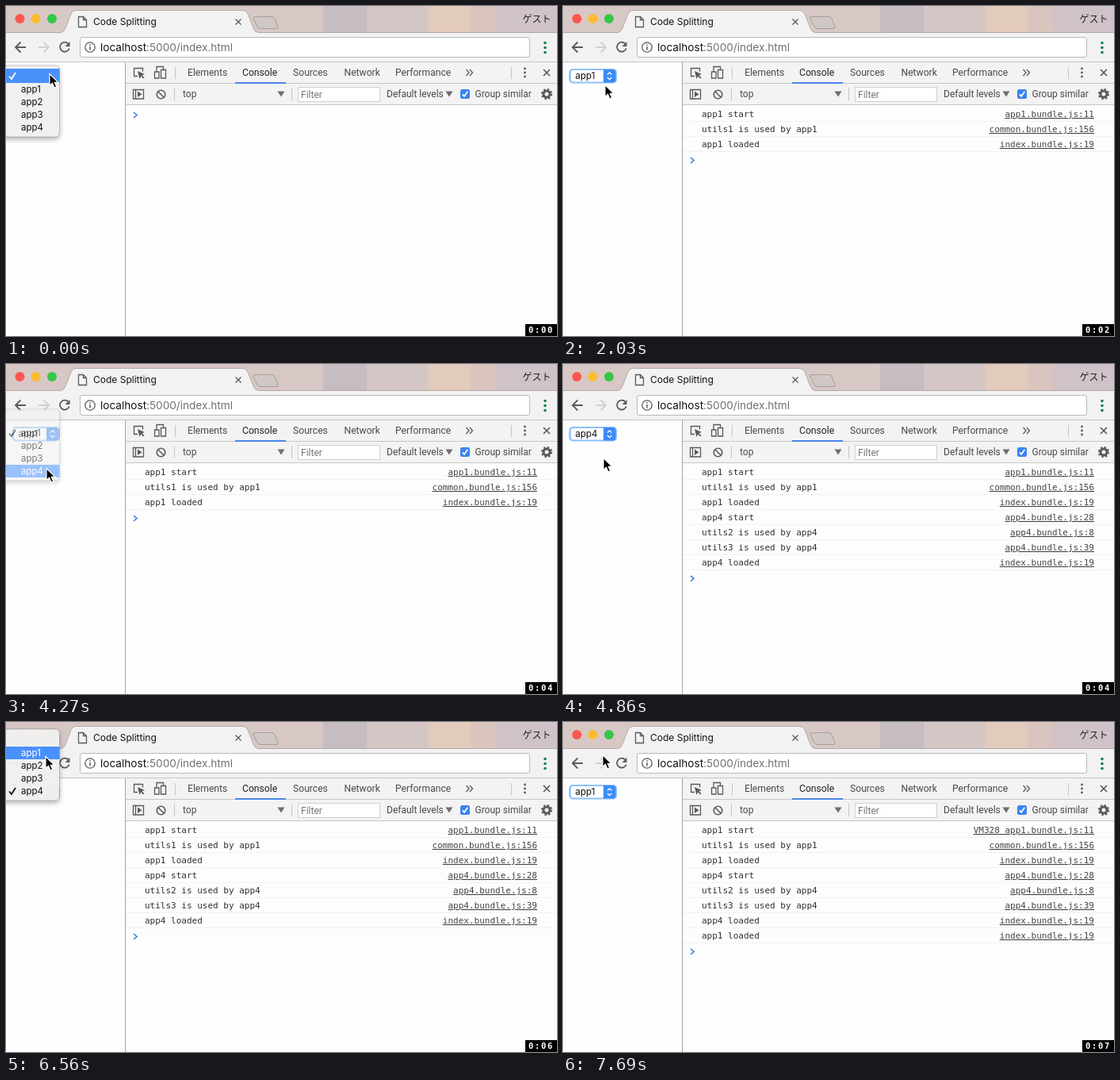
These frames come from a looping animation (695 by 416 pixels, 8 s). An HTML page:

```html
<!DOCTYPE html>
<html lang="en">
<head>
<meta charset="utf-8">
<title>Code Splitting</title>
<style>
  html, body { margin: 0; width: 100%; height: 100%; overflow: hidden; background: #fefefe; }
  svg { display: block; width: 695px; height: 416px; }
  text { white-space: pre; }
  .sys { font-family: Inter, sans-serif; fill: #111; }
  .ui { font: 12px Roboto, sans-serif; fill: #4a4a4a; }
  .mono { font: 11px "DejaVu Sans Mono", monospace; fill: #303030; }
  .link { text-anchor: end; text-decoration: underline; fill: #444; }
  .line { fill: none; stroke: #5a5a5a; stroke-width: 1.3; }
  .sep { fill: none; stroke: #c6c6c6; }
  .item { font-size: 11.5px; }
</style>
</head>
<body>
<svg viewBox="0 0 695 416">
  <defs>
    <filter id="shadow" x="-30%" y="-30%" width="160%" height="160%">
      <feDropShadow dx="0" dy="3" stdDeviation="3" flood-opacity=".3"/>
    </filter>
  </defs>

  <!-- tab strip -->
  <path fill="#d8c8c5" d="M0 0H695V34H0z"/>
  <path fill="#c5bdc2" d="M400 0h55v34h-55z"/>
  <path fill="#d5c6c6" d="M455 0h78v34h-78z"/>
  <path fill="#e2cabc" d="M533 0h53v34h-53z"/>
  <path fill="#dac5be" d="M586 0h32v34h-32z"/>
  <path fill="#cfc3c9" d="M618 0h77v34h-77z"/>
  <path fill="#f3f2f2" d="M0 34H695V71H0z"/>
  <path fill="#f3f2f2" stroke="#b3a8a6" d="M-1 33.5H69Q73 33 75 28L82 10Q84 5.500 88 5.500H299Q303 5.500 305 10L312 28Q314 33 318 33.500H696V72H-1z"/>
  <circle cx="17.500" cy="16" r="6" fill="#fc5750"/>
  <circle cx="37.500" cy="16" r="6" fill="#fdbc2f"/>
  <circle cx="58" cy="16" r="6" fill="#33c748"/>
  <path fill="#d0c8c4" stroke="#a49d9b" d="M313 13.500H335Q338 13.500 339 16L343 26Q344 28.500 341 28.500H321Q318 28.500 317 26L312 16Q311 13.500 313 13.500z"/>
  <path class="line" fill="#fff" d="M91.500 13.500h6l4 4v9h-10zM97.500 13.500v4h4"/>
  <text class="sys" x="110" y="24" font-size="12">Code Splitting</text>
  <path class="line" d="M289.500 16.500l7 7m0-7l-7 7"/>
  <text x="651.500" y="20.500" font-size="12" font-family="'Noto Sans CJK JP', 'Noto Sans CJK', sans-serif" fill="#222">ゲスト</text>

  <!-- address bar -->
  <path class="line" stroke-width="2" style="stroke-width:1.8" d="M25 52H12.500M18.500 45.500L12 52l6.500 6.500"/>
  <path class="line" style="stroke:#d0d0d0;stroke-width:1.8" d="M41 52h12.500M47.500 45.500L54 52l-6.500 6.500"/>
  <path class="line" style="stroke-width:1.8" d="M78.500 47.500A6 6 0 1 0 79.800 53.500"/>
  <path fill="#5a5a5a" d="M80.500 45v6h-6z"/>
  <rect x="93.500" y="39.500" width="567" height="25" rx="2.500" fill="#fff" stroke="#b9b9b9"/>
  <circle class="line" cx="106" cy="52" r="6.200"/>
  <path class="line" style="stroke-width:1.5" d="M106 51v4.500M106 48.200v1.500"/>
  <text class="sys" x="119" y="57" font-size="13.600">localhost<tspan fill="#707070">:5000/index.html</tspan></text>
  <g fill="#12804a"><circle cx="680" cy="46.500" r="1.800"/><circle cx="680" cy="52.500" r="1.800"/><circle cx="680" cy="58.500" r="1.800"/></g>

  <!-- page and developer tools -->
  <path fill="#fefefe" d="M0 71H150V416H0z"/>
  <path fill="#fdfdfd" d="M151 125H695V416H151z"/>
  <path fill="#f3f3f3" d="M151 71H695V125H151z"/>
  <path class="sep" d="M0 70.500H695M151 97.500H695M151 124.500H695M213.500 77v15M637.500 77v15M212.500 103v16M360.500 103v16"/>
  <path class="sep" style="stroke:#a3a3a3" d="M150.500 71V416"/>
  <path fill="#4a86e8" d="M289 96h64v2h-64z"/>
  <path class="line" d="M166 88.500h-4.500v-10h11v4"/>
  <path fill="#5a5a5a" d="M166 82l9 4-3.500 1.300 3 3-1.300 1.300-3-3L168.500 92z"/>
  <path class="line" d="M190 83v-6.500h8.500V80M190 91h-2.500v-8h5.500v8zM195.500 80.500h6v10.500h-6z"/>
  <g class="ui" style="font-size:12.150px">
    <text x="229" y="88">Elements</text>
    <text x="298" y="88" fill="#222">Console</text>
    <text x="362" y="88">Sources</text>
    <text x="426.500" y="88">Network</text>
    <text x="491" y="88">Performance</text>
  </g>
  <path class="line" d="M580.500 80l3.500 4-3.500 4M585 80l3.500 4-3.500 4"/>
  <g fill="#5a5a5a"><circle cx="654.500" cy="79" r="1.400"/><circle cx="654.500" cy="84" r="1.400"/><circle cx="654.500" cy="89" r="1.400"/></g>
  <path class="line" style="stroke-width:1.7" d="M678 80l8 8m0-8l-8 8"/>

  <path class="line" d="M160.500 105.500h13v11.500h-13zM163.500 105.500v11.500"/>
  <path fill="#5a5a5a" d="M166 107.500l5.500 3.800-5.500 3.800z"/>
  <circle class="line" style="stroke-width:1.600" cx="195.500" cy="111.500" r="5.300"/>
  <path class="line" style="stroke-width:1.600" d="M191.800 107.800l7.400 7.400"/>
  <path fill="#6e6e6e" d="M342.500 107.500h9l-4.500 7zM554.500 107.500h9l-4.500 7z"/>
  <rect x="368.500" y="102.500" width="103" height="18" fill="#fff" stroke="#d0d0d0"/>
  <g class="ui">
    <text x="223" y="115">top</text>
    <text x="372" y="116" fill="#757575">Filter</text>
    <text x="480" y="115">Default levels</text>
    <text x="591.500" y="115">Group similar</text>
  </g>
  <rect x="573" y="105" width="12" height="12" rx="2.500" fill="#3b82f0"/>
  <path fill="none" stroke="#fff" stroke-width="1.700" d="M575.800 111.300l2.300 2.500 4.200-6"/>
  <circle cx="682" cy="111" r="4" fill="none" stroke="#5a5a5a" stroke-width="3"/>
  <circle cx="682" cy="111" r="6" fill="none" stroke="#5a5a5a" stroke-width="2.200" stroke-dasharray="2.356"/>

  <g id="log"></g>
  <path id="prompt" fill="none" stroke="#3a7de0" stroke-width="1.600" d="M161 134l4 3.500-4 3.500"/>

  <!-- select box -->
  <rect x="7.500" y="79" width="60.500" height="18.500" rx="5" fill="#8fc0fb"/>
  <rect x="10" y="81" width="55.500" height="14.500" rx="3" fill="#fff"/>
  <path fill="#3c8cf6" d="M51 80h12q3.500 0 3.500 3.500v9.500q0 3.500-3.500 3.500H51z"/>
  <path fill="none" stroke="#fff" stroke-width="1.300" d="M56 86.500l2.700-2.700 2.700 2.700M56 90l2.700 2.700 2.700-2.700"/>
  <text id="value" class="sys item" x="15.500" y="92"></text>

  <!-- drop-down list; y = 0 is its top edge -->
  <g id="menu">
    <rect x="-8" y="0" width="75.500" height="90" rx="5" fill="#f1f1f1" fill-opacity=".97" stroke="#000" stroke-opacity=".2" filter="url(#shadow)"/>
    <rect id="bar" x="0" width="67.500" fill="#4a90fb"/>
    <g id="items"></g>
    <path id="check" fill="none" stroke-width="1.800" d="M4 0.500l3 3.500 5-8"/>
  </g>

  <path id="cursor" fill="#000" stroke="#fff" stroke-width="1.200" d="M0-.5V14.500L3.500 11.300 6 17l2.700-1.200L6.300 10.300H11z"/>

  <path d="M655 401h40v15h-40z"/>
  <text id="clock" x="659" y="412" font-family="'DejaVu Sans Mono', monospace" font-weight="bold" font-size="10.500" letter-spacing="1.700" fill="#fff"></text>
</svg>

<script>
const $ = id => document.getElementById(id);
const LOOP = 8000;

const logs = [
  ['app1 start', 'app1.bundle.js:11'],
  ['utils1 is used by app1', 'common.bundle.js:156'],
  ['app1 loaded', 'index.bundle.js:19'],
  ['app4 start', 'app4.bundle.js:28'],
  ['utils2 is used by app4', 'app4.bundle.js:8'],
  ['utils3 is used by app4', 'app4.bundle.js:39'],
  ['app4 loaded', 'index.bundle.js:19'],
  ['app1 loaded', 'index.bundle.js:19']
];

// Each step overrides part of the state; menu is the list's opacity.
const steps = [
  [0, { x: 55, y: 86, menu: 1, value: 0, lines: 0, sec: 0 }],
  [150, { y: 92 }], [290, { y: 101 }], [440, { x: 54, y: 106 }],
  [1020, { sec: 1 }], [1140, { menu: .55 }],
  [1280, { menu: 0, value: 1 }], [1430, { lines: 3 }],
  [2030, { x: 53, y: 100, sec: 2 }], [2180, { x: 51, y: 91 }], [2330, { y: 87 }],
  [2780, { menu: 1 }],
  [3080, { y: 97, sec: 3 }], [3230, { y: 113 }], [3370, { y: 126 }], [3520, { y: 132 }],
  [3970, { sec: 4 }],
  [4270, { menu: .55 }], [4420, { menu: 0, value: 4 }], [4560, { lines: 7 }],
  [4860, { y: 119 }], [5010, { x: 52, y: 102, sec: 5 }], [5130, { x: 53, y: 92 }], [5260, { y: 89 }],
  [5560, { menu: 1 }],
  [6010, { x: 52, y: 75, sec: 6 }], [6140, { x: 51, y: 58 }], [6260, { x: 50, y: 48 }],
  [6560, { y: 44 }], [6710, { y: 43 }],
  [7000, { menu: .55, sec: 7 }], [7140, { menu: 0, value: 1 }],
  [7430, { lines: 8 }], [7690, { y: 42 }]
];

const rowTop = i => i ? 6 + 16 * i : 4;
const rowHeight = i => i ? 16 : 18;

$('log').innerHTML = logs.map(([text, link], i) => {
  const y = 140 + 19 * i;
  return `<g><text class="mono" x="175" y="${y}">${text}</text>
    <text class="mono link" x="670" y="${y}">${link}</text>
    <path d="M151 ${y + 5.5}H695" stroke="#f2f2f2"/></g>`;
}).join('');
$('items').innerHTML = [1, 2, 3, 4].map(i =>
  `<text class="sys item" x="19" y="${rowTop(i) + 12}">app${i}</text>`).join('');
const firstLink = $('log').querySelector('.link');

function draw(t) {
  const s = Object.assign({}, ...steps.filter(([at]) => at <= t).map(([, change]) => change));
  const top = 79 - rowTop(s.value);
  const hover = Math.max(0, Math.min(4, Math.floor((s.y - top - 6) / 16)));

  $('menu').setAttribute('transform', `translate(0 ${top})`);
  $('menu').setAttribute('opacity', s.menu);
  $('bar').setAttribute('y', rowTop(hover));
  $('bar').setAttribute('height', rowHeight(hover));
  [...$('items').children].forEach((item, i) => item.style.fill = i + 1 === hover ? '#fff' : '#111');
  $('check').setAttribute('transform', `translate(0 ${rowTop(s.value) + rowHeight(s.value) / 2})`);
  $('check').setAttribute('stroke', hover === s.value ? '#fff' : '#111');

  $('value').textContent = s.value ? 'app' + s.value : '';
  [...$('log').children].forEach((row, i) => row.style.display = i < s.lines ? '' : 'none');
  firstLink.textContent = (s.lines === 8 ? 'VM328 ' : '') + logs[0][1];
  $('prompt').setAttribute('transform', `translate(0 ${19 * s.lines})`);
  $('cursor').setAttribute('transform', `translate(${s.x} ${s.y})`);
  $('clock').textContent = '0:0' + s.sec;
}

const start = performance.now();
function tick() {
  draw((performance.now() - start) % LOOP);
  requestAnimationFrame(tick);
}
tick();
</script>
</body>
</html>
```
